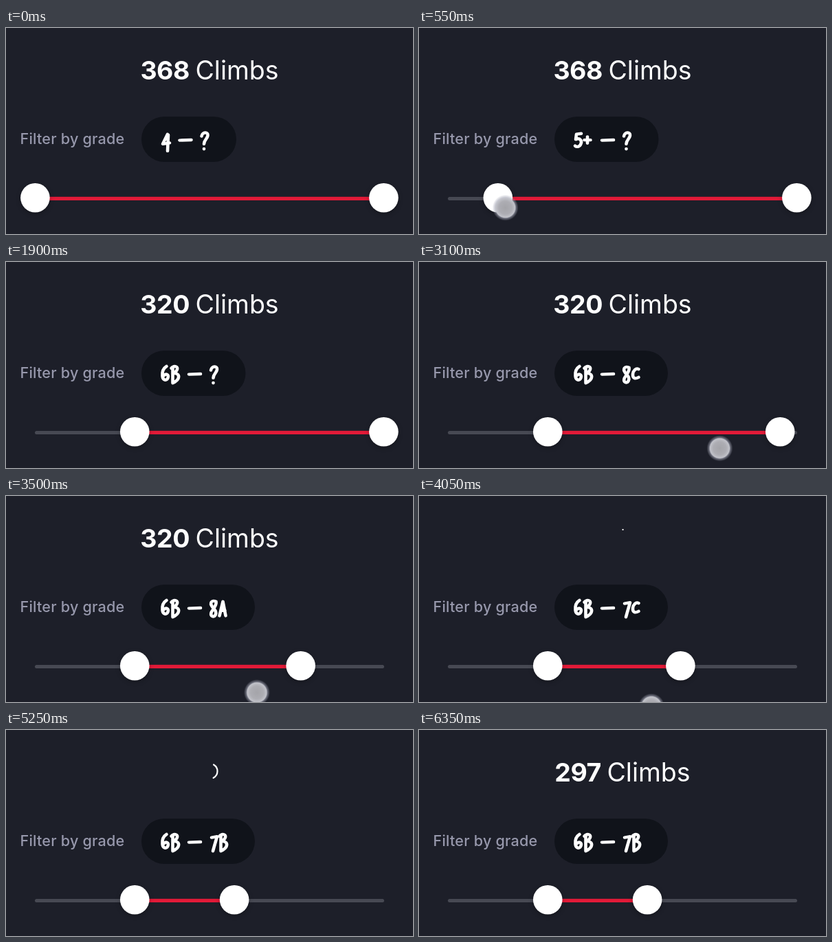
An HTML page for the animation above (6700 ms loop, 592 by 300 pixels).

```html
<!DOCTYPE html>
<html lang="en">
<head>
<meta charset="utf-8">
<title>Grade filter</title>
<style>
  html, body { margin: 0; width: 100%; height: 100%; overflow: hidden; background: #1d1f29; }
  svg { display: block; }
  text { font-family: Inter, sans-serif; }
  .title { font-size: 37.5px; fill: #fff; text-anchor: middle; word-spacing: -2px; }
  .count { font-weight: 700; letter-spacing: -.5px; }
  .label { font-size: 21.6px; font-weight: 500; letter-spacing: .2px; fill: #9798ac; }
  .ink { fill: none; stroke: #fff; stroke-width: 4.6; stroke-linecap: round; stroke-linejoin: round; }
  .thumb { fill: #fff; filter: drop-shadow(0 2px 3px rgba(0, 0, 0, .3)); }
</style>
</head>
<body>
<svg width="592" height="300" viewBox="0 0 592 300">
  <radialGradient id="glow">
    <stop offset="0" stop-color="#a4a4a9"/>
    <stop offset=".5" stop-color="#adadb3"/>
    <stop offset=".74" stop-color="#c2c3ca"/>
    <stop offset=".82" stop-color="#a9abba" stop-opacity=".55"/>
    <stop offset="1" stop-color="#a9abba" stop-opacity="0"/>
  </radialGradient>
  <rect width="592" height="300" fill="#1d1f29"/>
  <text id="title" class="title" x="296" y="74.5"><tspan id="count" class="count"></tspan> Climbs</text>
  <path id="spinner" fill="none" stroke="#fff" stroke-width="2.2" stroke-linecap="round"/>
  <text class="label" x="20.5" y="168.5">Filter by grade</text>
  <rect id="pill" x="197" y="129" height="66" rx="33" fill="#10131a"/>
  <g id="grades" class="ink" role="img"></g>
  <rect x="42" y="246" width="508" height="5" rx="2.5" fill="#474953"/>
  <rect id="range" y="245.8" height="5.2" fill="#e21a38"/>
  <circle id="low" class="thumb" cy="247.2" r="21.3"/>
  <circle id="high" class="thumb" cy="247.2" r="21.3"/>
  <circle id="touch" r="19" fill="url(#glow)"/>
</svg>
<script>
const LOOP = 6700, LEFT = 42.4, STEP = 507 / 21, ADVANCE = 13.5;
const GRADES = '4 4+ 5 5+ 6A 6A+ 6B 6B+ 6C 6C+ 7A 7A+ 7B 7B+ 7C 7C+ 8A 8A+ 8B 8B+ 8C ?'.split(' ');

// Brush lettering, each glyph about 13 x 29
const GLYPHS = {
  4: 'M10 5L3 20L13 18.5M11 6L10 31',
  5: 'M11 4L4 5L3 13C9 10 13 15 10 21C8 25 4 25 2 23',
  6: 'M8.5 2C4 5 2 11 2.5 17C3 24 8.5 25 10.5 20C12 15 8 12 4 17',
  7: 'M4 7L12 5.5C10 13 8 20 6 28',
  8: 'M10.5 4C4 1 1 6 5 12C9 17 12 20 9.5 25C7 29 2 27 3.5 21C5.5 16 12 10 10.5 4Z',
  A: 'M2 26L7 4L11 26M4 18H10',
  B: 'M4 3V27M2 5C6 0 13 2 10 8C9 11 6 12 5 13C11 12 14 16 12 21C10 25 6 27 4 28',
  C: 'M11 6.5C7 4 3 9 2.5 14C2 21 6 22 11 19',
  '+': 'M2 14H11M6.5 9V19',
  '?': 'M3 8C4 1 13 1 12 7C11 13 7 13 6.5 20M6.5 27.5v.4',
  '-': 'M2 14.4L19 13.8'
};

// The finger glides to rest; the thumbs follow it in whole grades
const DRAGS = [
  { start: 300, end: 950, x: 22, dx: 145, tau: 200, y: 259, slope: .011 },
  { start: 2850, end: 4550, x: 549, dx: -218, tau: 350, y: 262, slope: .037 }
];
const LOADS = [
  { out: 700, spin: 1000, show: 1500, count: 320 },
  { out: 3800, spin: 4050, show: 5500, count: 297 }
];

const $ = id => document.getElementById(id);
const set = (id, attrs) => { for (const k in attrs) $(id).setAttribute(k, attrs[k]); };
const ramp = (t, from, to) => Math.min(1, Math.max(0, (t - from) / (to - from)));
const stepped = (t, from, to, count) => Math.round(count * (1 - (1 - ramp(t, from, to)) ** 2));

let shown = '';
function drawGrades(from, to) {
  const key = from + ' – ' + to;
  if (key === shown) return;
  shown = key;
  let art = '';
  const write = (text, x) => {
    for (const c of text) {
      art += `<path transform="translate(${x} 150) scale(1 .94)" d="${GLYPHS[c]}"/>`;
      x += ADVANCE;
    }
    return x;
  };
  const dash = write(from, 225) + 12;
  write('-', dash);
  const end = write(to, dash + 31);
  $('grades').innerHTML = art;
  set('grades', { 'aria-label': key });
  set('pill', { width: end + 40 - 197 });
}

// An arc that leaves the top, makes one turn and closes again
function spinnerPath(p) {
  if (p >= 1) return '';
  const point = turn => {
    const a = turn * 2 * Math.PI;
    return `${(296.5 + 11 * Math.sin(a)).toFixed(2)} ${(60 - 11 * Math.cos(a)).toFixed(2)}`;
  };
  const tail = p ** 3.6, head = Math.max(p ** 1.25, tail + .002);
  return `M${point(tail)}A11 11 0 0 1 ${point(head)}`;
}

function drawTitle(t) {
  let count = 368, opacity = 1, arc = '';
  for (const load of LOADS) {
    if (t >= load.spin) count = load.count;
    if (t >= load.spin && t < load.show) arc = spinnerPath((t - load.spin) % 500 / 400);
    opacity *= 1 - ramp(t, load.out, load.out + 200) + ramp(t, load.show, load.show + 350);
  }
  if ($('count').textContent !== String(count)) $('count').textContent = count;
  set('title', { opacity });
  set('spinner', { d: arc });
}

function drawTouch(t) {
  const drag = DRAGS.find(d => t >= d.start && t < d.end);
  if (!drag) return set('touch', { opacity: 0 });
  const age = t - drag.start;
  set('touch', {
    cx: drag.x + drag.dx * (1 - Math.exp(-age / drag.tau)),
    cy: drag.y + drag.slope * age,
    opacity: Math.min(ramp(age, 0, 60), ramp(drag.end - t, 0, 90))
  });
}

function render(t) {
  const low = stepped(t, 340, 940, 6);
  const high = 21 - stepped(t, 2940, 4840, 9);
  const x1 = LEFT + low * STEP, x2 = LEFT + high * STEP;
  set('low', { cx: x1 });
  set('high', { cx: x2 });
  set('range', { x: x1, width: x2 - x1 });
  drawGrades(GRADES[low], GRADES[high]);
  drawTitle(t);
  drawTouch(t);
}

const begin = performance.now();
function tick() {
  render((performance.now() - begin) % LOOP);
  requestAnimationFrame(tick);
}
render(0);
requestAnimationFrame(tick);
</script>
</body>
</html>
```
